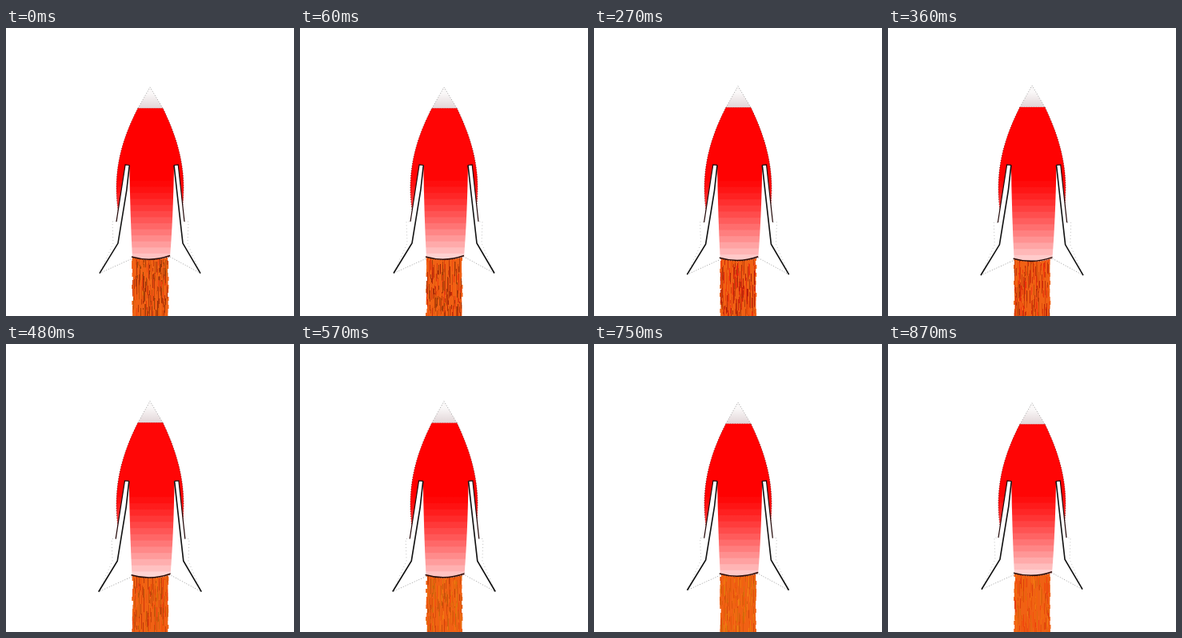
An HTML page with a canvas for the animation above (900 ms loop, 360 px wide and 360 px high).

```html
<!DOCTYPE html>
<html lang="en">
<head>
<meta charset="utf-8">
<title>Rocket</title>
<style>
html, body { margin: 0; width: 100%; height: 100%; overflow: hidden; background: #fff; }
canvas { display: block; width: 360px; height: 360px; }
</style>
</head>
<body>
<canvas id="stage" width="360" height="360"></canvas>
<script>
const ctx = document.getElementById('stage').getContext('2d');
const LOOP = 900, STEP = 30, STEPS = LOOP / STEP;
const CX = 180, CY = 178;

// key points of each fin; side is -1 for left, 1 for right
const FINS = [
  { side: -1, top: [154.3, 171.5], bend: [140, 269], tip: [117, 306.5], root: [158, 288] },
  { side: 1, top: [210, 171.5], bend: [221, 269], tip: [243, 306.5], root: [205, 286] }
];

function random(seed) {
  return () => {
    seed = (seed * 1664525 + 1013904223) >>> 0;
    return seed / 4294967296;
  };
}

function trace(...points) {
  ctx.beginPath();
  points.forEach(p => ctx.lineTo(...p));
}

function stroke(color, width, dash = [], offset = 0) {
  ctx.strokeStyle = color;
  ctx.lineWidth = width;
  ctx.setLineDash(dash);
  ctx.lineDashOffset = offset;
  ctx.stroke();
}

// streaks lose contrast over the loop while their hue drifts around orange
function drawFlame(step) {
  const top = 286, rnd = random(step * 7919 + 31);
  const contrast = 1 - step / STEPS;
  const drift = -6 * Math.sin(2 * Math.PI * step / STEPS);
  ctx.fillStyle = 'hsl(21, 88%, 51%)';
  ctx.fillRect(159, top, 43, 360 - top);
  for (let y = top; y < 360; y += 5) {
    const left = 157 + rnd() * 2, right = 202 + rnd() * 1.5;
    ctx.fillRect(left, y, right - left, 5);
  }
  for (let i = 0; i < 190; i++) {
    const hue = 19 + drift + (rnd() - 0.5) * 14;
    const light = 52 - rnd() * (6 + 16 * contrast);
    ctx.fillStyle = `hsl(${hue}, 90%, ${light}%)`;
    const x = 158 + Math.floor(rnd() * 44);
    ctx.fillRect(x, top + Math.floor(rnd() * 70), 1, 4 + rnd() * 16);
  }
}

// red fading to pale pink in narrow bands
function bodyFill(shift) {
  const top = 184, height = 106, bands = 14;
  const fill = ctx.createLinearGradient(0, top, 0, top + height);
  for (let i = 0; i < bands; i++) {
    const u = Math.min(1, (i + shift) / bands);
    const tint = Math.round(214 * u ** 1.3);
    const color = `rgb(255, ${tint}, ${tint})`;
    fill.addColorStop(i / bands, color);
    fill.addColorStop((i + 0.85) / bands, color);
  }
  return fill;
}

function drawBody(step) {
  ctx.beginPath();
  ctx.moveTo(165, 100);
  ctx.bezierCurveTo(149, 131, 138, 163, 138, 200);
  ctx.bezierCurveTo(138, 235, 148, 265, 158, 287);
  ctx.quadraticCurveTo(181, 293, 205, 286);
  ctx.bezierCurveTo(214, 262, 222, 235, 222, 200);
  ctx.bezierCurveTo(222, 163, 211, 131, 196, 100);
  ctx.closePath();
  ctx.fillStyle = bodyFill((step * 0.37) % 1);
  ctx.fill();
  stroke('#400', 0.7, [1, 2], step * 0.7);
}

function drawNose() {
  const fill = ctx.createLinearGradient(0, 74, 0, 100);
  fill.addColorStop(0.3, '#faf8f8');
  fill.addColorStop(1, '#e2d6d8');
  trace([165, 100.3], [180, 74], [196, 100.3]);
  ctx.fillStyle = fill;
  ctx.fill();
  stroke('#777', 0.7, [1, 2]);
}

function drawFin({ side, top, bend, tip, root }, step) {
  const [x, y] = top;
  const corner = [x + 5.2 * side, y - 0.5];
  const heel = [bend[0] + 2 * side, 242];
  const waist = [x - side, 236];

  trace(corner, top);
  ctx.quadraticCurveTo(...waist, ...root);
  [tip, bend, heel].forEach(p => ctx.lineTo(...p));
  ctx.fillStyle = '#fff';
  ctx.fill();

  trace(heel, [heel[0] + 5 * side, heel[1]], [bend[0] + 6 * side, bend[1]], tip);
  stroke('#999', 0.6, [1, 3], step * 1.3);
  trace(tip, root);
  stroke('#777', 0.7, [1, 2], step);
  trace(top, corner, heel);
  stroke('#210707', 1.2);
  trace(top, [x + 3.5 * side, 203], bend, tip);
  stroke('#111', 1.6);
}

function draw(step) {
  const swell = (1 + Math.cos(2 * Math.PI * (step / STEPS - 0.55))) / 2;
  ctx.setTransform(1, 0, 0, 1, 0, 0);
  ctx.fillStyle = '#fff';
  ctx.fillRect(0, 0, 360, 360);
  drawFlame(step);

  ctx.translate(CX, CY);
  ctx.scale(1, 1 + 0.025 * swell);
  ctx.translate(-CX, -CY);
  drawBody(step);
  drawNose();

  // fins spread outward as the rocket swells
  ctx.translate(CX, 0);
  ctx.scale(1 + 0.02 * swell, 1);
  ctx.translate(-CX, 0);
  FINS.forEach(fin => drawFin(fin, step));
  ctx.beginPath();
  ctx.moveTo(157, 286);
  ctx.quadraticCurveTo(181, 293, 205, 284.5);
  stroke('#2a0c06', 1.5);
}

const start = performance.now();
function tick() {
  draw(Math.floor((performance.now() - start) % LOOP / STEP));
  requestAnimationFrame(tick);
}
tick();
</script>
</body>
</html>
```
